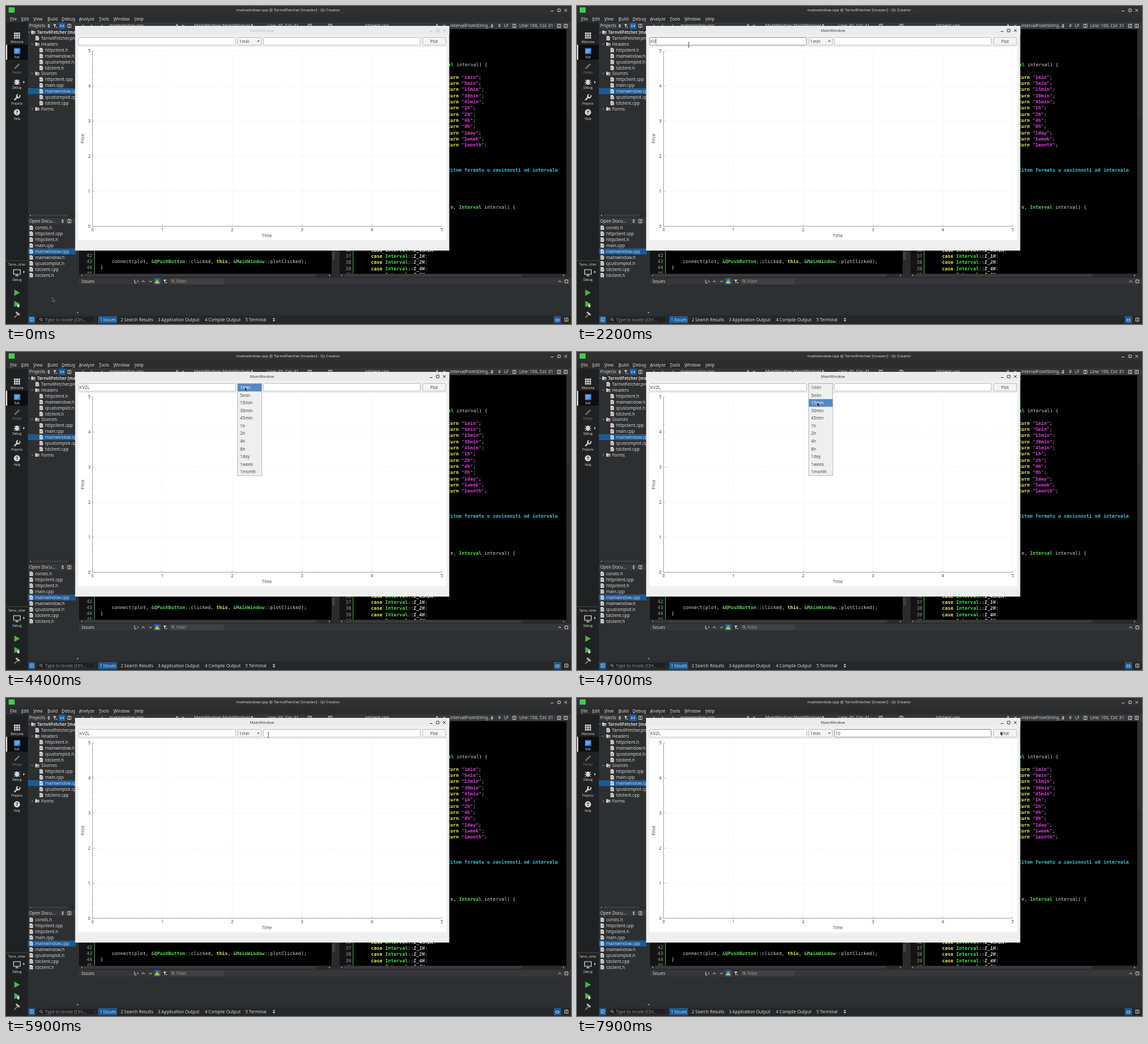
An HTML page for the animation above (8 s loop, 852 px wide and 480 px high).

```html
<!DOCTYPE html>
<html lang="en">
<head>
<meta charset="utf-8">
<title>IDE with plot window</title>
<style>
html, body { margin: 0; width: 100%; height: 100%; overflow: hidden; background: #000; }
svg { display: block; width: 100vw; height: 100vh; }
text { font-family: "Noto Sans", "Open Sans", sans-serif; white-space: pre; }
.mono { font-family: "DejaVu Sans Mono", "Noto Sans Mono", monospace; font-size: 7.08px; }
</style>
</head>
<body>
<svg id="stage" viewBox="0 0 852 480" xmlns="http://www.w3.org/2000/svg"></svg>
<script>
const LIGHT = '#d4d5d6', BLUE = '#1c5a96', GREEN = '#4be04b', YELLOW = '#f0f060',
      MAGENTA = '#e040e0', CYAN = '#30c8e0', DARK = '#4a4a4a';
const TRACK = '#2a2b2c', THUMB = '#3a3b3c', PANEL = '#2e2f30';
const PROJECT = 'TarnvilFetcher', SYMBOL = 'KVZL';
const INTERVALS = ['1min', '5min', '15min', '30min', '45min', '1h', '2h', '4h', '8h', '1day', '1week', '1month'];

const esc = s => s.replace(/&/g, '&amp;').replace(/</g, '&lt;');
const rect = (x, y, w, h, fill, extra = '') =>
  `<rect x="${x}" y="${y}" width="${w}" height="${h}" fill="${fill}" ${extra}/>`;
const path = (d, stroke = LIGHT, width = 0.9, extra = '') =>
  `<path d="${d}" fill="none" stroke="${stroke}" stroke-width="${width}" ${extra}/>`;
const shape = (d, fill = LIGHT, extra = '') => `<path d="${d}" fill="${fill}" ${extra}/>`;
// y is the vertical middle of the capitals
const text = (x, y, s, { size = 6.45, fill = LIGHT, anchor = 'start', extra = '' } = {}) =>
  `<text x="${x}" y="${y + size * 0.35}" font-size="${size}" fill="${fill}" text-anchor="${anchor}" ${extra}>${esc(s)}</text>`;
// runs with a colour of their own are bold
const code = (x, y, runs, extra = '') =>
  `<text class="mono" x="${x}" y="${y + 2.5}" ${extra}>` +
  runs.map(([s, fill, style = 'normal']) =>
    `<tspan fill="${fill || LIGHT}" font-weight="${fill ? 'bold' : 'normal'}" font-style="${style}">${esc(s)}</tspan>`).join('') + '</text>';
const range = (n, f) => Array.from({ length: n }, (_, i) => f(i)).join('');

const updown = (x, y) => shape(`M${x - 2} ${y - .6}l2 -2.4l2 2.4zM${x - 2} ${y + .6}l2 2.4l2 -2.4z`);
const funnel = (x, y) => shape(`M${x - 3} ${y - 2.5}h5l-2 2.5v3l-1 -1v-2z`) + rect(x + 1, y + 1.6, 2, 1, LIGHT);
const splitIcon = (x, y) => path(`M${x - 2.5} ${y - 2.5}h5v5h-5zM${x} ${y - 2.5}v5`, LIGHT, .8);
const cross = (x, y, r, stroke = LIGHT) => path(`M${x - r} ${y - r}l${2 * r} ${2 * r}m0 ${-2 * r}l${-2 * r} ${2 * r}`, stroke);
const square = (x, y, r, stroke = LIGHT) => path(`M${x - r} ${y - r}h${2 * r}v${2 * r}h${-2 * r}z`, stroke);
const fileIcon = (x, y) => shape(`M${x - 2.5} ${y - 3.3}h3.5l1.7 1.7v4.9h-5.2z`, '#d8d8d8') +
  path(`M${x - 1.4} ${y - .6}h2.8m-2.8 1.6h2.8`, '#777', .6);
const folderIcon = (x, y) => shape(`M${x - 3} ${y - 2.5}h2.5l1 1h2.8v4.2h-6.3z`, '#c9c9c9') + rect(x, y, 3, 2.6, '#a87878');
const magnifier = (x, y) => `<circle cx="${x}" cy="${y - .6}" r="1.7" fill="none" stroke="#aaa" stroke-width=".8"/>` +
  path(`M${x + 1.2} ${y + .6}l1.8 1.8`, '#aaa');

function chrome() {
  return rect(0, 0, 852, 480, '#000') + rect(0, 0, 852, 13, '#303030') + rect(0, 13, 852, 12, '#2b2c2d') +
    rect(4, 2, 9, 8, '#41cd52') +
    text(425.5, 6.3, `mainwindow.cpp @ ${PROJECT} [master] - Qt Creator`, { size: 6.03, anchor: 'middle' }) +
    path('M821.5 7.5h4') + square(834, 6.5, 1.9) + cross(844, 6.5, 2) +
    [[6, 'File'], [23, 'Edit'], [41, 'View'], [62.5, 'Build'], [84, 'Debug'], [110, 'Analyze'], [140, 'Tools'], [162, 'Window'], [193.5, 'Help']]
      .map(([x, s]) => text(x, 19.3, s) + path(`M${x} 22.8h3`, LIGHT, .5)).join('') +
    rect(33, 25, 819, 10, '#363738');
}

function editorBar() {
  return text(35, 29.8, 'Projects') + updown(64.5, 30) + funnel(74, 30) + rect(79.5, 25, 10, 10, BLUE) +
    path('M82 30h5M83.5 28.3h-1.5v3.4h1.5M85.5 28.3h1.5v3.4h-1.5', '#9ccfff', .8) + splitIcon(95.5, 30) +
    path('M117 28l-2 2l2 2M128 28l2 2l-2 2M145 28v4') + text(156, 29.5, 'mainwindow.cpp') +
    updown(258, 30) + cross(267, 30, 1.8) + text(284, 29.5, 'MainWindow::MainWindow(…') + updown(371, 30) +
    text(394, 29.5, 'Line: 40, Col: 41') + splitIcon(458, 30) + splitIcon(489, 30) +
    text(542, 29.5, 'tdclient.cpp') + updown(650, 30) + cross(661, 30, 1.8) +
    text(670, 29.8, 'intervalFromString…') + updown(733, 30) + text(742, 29.8, '#') + text(751, 29.8, 'LF') +
    splitIcon(766.5, 30) + text(774, 29.8, 'Line: 106, Col: 31') + splitIcon(834, 30) + splitIcon(844, 30);
}

function modeBar() {
  const label = (y, s, fill = LIGHT) => text(16.5, y, s, { size: 4.5, fill, anchor: 'middle' });
  const play = y => shape(`M12.5 ${y}l8.5 4.7l-8.5 4.7z`, '#46b84a');
  const submenu = y => shape(`M26 ${y}l2.3 2l-2.3 2z`);
  return rect(0, 25, 33, 455, '#202122') + rect(0, 58.5, 33, 22.5, '#0c0d0e') + rect(0, 58.5, 1.8, 22.5, '#e0e0e0') +
    range(9, i => rect(12 + i % 3 * 3.3, 40 + Math.floor(i / 3) * 3.3, 2.6, 2.6, LIGHT)) + label(54.3, 'Welcome') +
    rect(12, 63.5, 9.5, 9, '#3c7fd0') + path('M13.5 66h6.5m-6.5 2h6.5m-6.5 2h4', '#d8e8ff', .7) + label(77, 'Edit') +
    path('M13 94.5l7 -7', '#777', 2.2) + label(100.3, 'Design', '#777') +
    `<ellipse cx="16.5" cy="115" rx="3" ry="4" fill="${LIGHT}"/>` +
    path('M12 111.5l2.5 2m-3 2h10m-9.5 3.5l2.5 -2m6.5 -5.5l-2.5 2m2.5 5.5l-2.5 -2') +
    submenu(113) + label(123.6, 'Debug') +
    path('M12.5 142l5.5 -5.5', LIGHT, 2) + path('M20.5 134.5a2.6 2.6 0 1 1 -2.5 -1', LIGHT, 1.6) + label(147, 'Projects') +
    `<circle cx="16.5" cy="160.5" r="4.7" fill="${LIGHT}"/>` +
    text(16.5, 160.6, '?', { size: 7.5, fill: '#202122', anchor: 'middle', extra: 'font-weight="bold"' }) + label(170, 'Help') +
    path('M0 384.5h33', '#444') + label(390, 'Tarnv…tcher') +
    path('M11.5 398h10v7h-10zM14 407.3h5M16.5 405v2', LIGHT, 1.1) + submenu(399.5) + label(413.7, 'Debug') +
    play(428) + play(445) + `<ellipse cx="18.5" cy="452.5" rx="2" ry="2.6" fill="${LIGHT}"/>` +
    path('M12.5 470.5l6 -6', '#b07a5a', 1.6) + path('M15 462l5.5 4.5', '#bbb', 2.4);
}

function sidebar() {
  const headers = ['httpclient.h', 'mainwindow.h', 'qcustomplot.h', 'tdclient.h'];
  const sources = ['httpclient.cpp', 'main.cpp', 'mainwindow.cpp', 'qcustomplot.cpp', 'tdclient.cpp'];
  const docs = ['consts.h', 'httpclient.cpp', 'httpclient.h', 'main.cpp', 'mainwindow.cpp', 'mainwindow.h', 'qcustomplot.h', 'tdclient.cpp', 'tdclient.h'];
  const open = (x, y) => path(`M${x - 1.5} ${y - .8}l1.5 1.6l1.5 -1.6`, '#aaa', .8);
  const files = (list, x, top) => list.map((s, i) => fileIcon(x, top + i * 8.95) + text(x + 6, top + i * 8.95, s)).join('');
  const group = (y, s) => folderIcon(47, y) + text(53, y, s);
  return rect(33, 35, 77, 432, PANEL) + rect(33, 124, 72, 9, BLUE) + rect(33, 366, 72, 9, BLUE) +
    open(35, 39.5) + folderIcon(41, 39.5) + text(47, 39.5, `${PROJECT} [master]`, { size: 6.2, extra: 'font-weight="bold"' }) +
    fileIcon(47, 48.5) + text(53, 48.5, `${PROJECT}.pro`) +
    open(39.5, 57.5) + group(57.5, 'Headers') + files(headers, 53, 66.5) +
    open(39.5, 101.7) + group(101.7, 'Sources') + files(sources, 53, 110.7) +
    path('M38.7 154l1.6 1.5l-1.6 1.5', '#aaa', .8) + group(155.3, 'Forms') +
    rect(33, 313, 77, 6, TRACK) + rect(40, 314.2, 54, 3.6, THUMB) + shape('M37.5 314.5v3l-2 -1.5z', '#aaa') +
    rect(33, 320, 77, 9.5, '#363738') + text(35, 324.8, 'Open Docu…') + updown(85.5, 324.8) + splitIcon(95.5, 324.8) +
    files(docs, 38, 334.7) + path('M110.5 369v98', '#1a1a1a') + shape('M106.5 462h3l-1.5 2z', '#aaa');
}

function editors() {
  const number = (x, y, n) => code(x, y, [[String(n)]], 'opacity=".65"');
  const cases = ['I_45MIN', 'I_1H', 'I_2H', 'I_4H', 'I_8H'];
  return '<g clip-path="url(#code)">' + rect(110, 369, 23, 36, '#141414') + rect(503, 369, 21, 36, '#141414') +
    [42, 43, 44, 45].map((n, i) => number(121.5, 376 + i * 9.3, n)).join('') +
    path('M133.5 369v35M523.5 369v35', '#2f9a35', 1) +
    code(159.5, 385.3, [['connect(plot, &'], ['QPushButton', GREEN], ['::clicked, '], ['this', YELLOW], [', &'], ['MainWindow', GREEN], ['::plotClicked);']]) +
    code(142.5, 394.6, [['}']]) +
    cases.map((s, i) => number(512, 368 + i * 9.4, 36 + i) +
      code(550.5, 368 + i * 9.4, [['case ', YELLOW], ['Interval', GREEN], ['::'], [s, LIGHT, 'italic'], [':']])).join('') + '</g>' +
    code(640.8, 88.3, [['Interval', GREEN], [' interval) {']]) +
    INTERVALS.map((s, i) => code(657.2, 107 + i * 9.36, [['return ', YELLOW], [`"${s}"`, MAGENTA], [';']])).join('') +
    code(832, 247, [['različitom formatu u zavisnosti od intervala', CYAN]], 'text-anchor="end"') +
    code(670.2, 303, [['e, '], ['Interval', GREEN], [' interval) {']]) +
    rect(845, 35, 7, 369, TRACK) + rect(846, 35, 5, 134, '#303132') +
    rect(491, 369, 6, 35, TRACK) + rect(492, 371, 4, 12, '#404142') + rect(497, 369, 6, 41, TRACK) +
    rect(110, 404, 387, 6, TRACK) + rect(117, 405, 350, 3.6, THUMB) +
    rect(503, 404, 349, 6, TRACK) + rect(510, 405, 267, 3.6, THUMB) +
    shape('M115 405.2v3l-2 -1.5zM487 405.2v3l2 -1.5zM507 405.2v3l-2 -1.5zM840 405.2v3l2 -1.5z', '#aaa');
}

function bottomPanels() {
  const tabs = [[173, '2 Search Results'], [229, '3 Application Output'], [300, '4 Compile Output'], [361, '5 Terminal']];
  return rect(110, 410, 742, 57, PANEL) + rect(110, 410.5, 742, 10, '#363738') + text(114, 415.6, 'Issues') +
    path('M194 413v5h3M198 414l1.5 3M205 417l2 -2.5l2 2.5M216 414.5l2 2.5l2 -2.5') + rect(223, 410.5, 10, 10, BLUE) +
    shape('M228 412l3.7 6.5h-7.4z', '#f0c830') + path('M228 414.3v2.2', '#333', .8) + funnel(240, 415.5) +
    rect(247, 411, 81, 9, '#404142') + magnifier(251.5, 415.5) + text(257, 415.6, 'Filter', { fill: '#9a9b9c' }) +
    path('M833 417l2 -2.5l2 2.5') + square(845, 415.7, 2.2) +
    rect(33, 467, 819, 13, '#262728') +
    rect(33.5, 468, 10.5, 11, BLUE) + splitIcon(38.8, 473.3) +
    rect(47, 468.5, 87, 9.5, '#1f2021', 'stroke="#3a3b3c" stroke-width=".6"') + magnifier(52.5, 473.4) +
    text(59, 473.4, 'Type to locate (Ctrl…', { fill: '#8d8e8f' }) + rect(139, 468, 28.5, 11, BLUE) + text(141.5, 473.4, '1 Issues') +
    tabs.map(([x, s]) => text(x, 473.4, s)).join('') + updown(404, 473.4) +
    rect(826, 468, 11, 11, BLUE) + path('M829 475.5v-3h5v3z') + splitIcon(845, 473.4);
}

const field = (id, x, w, fill = '#fff') =>
  rect(x + .4, 47.5, w - .8, 11.5, fill, `id="${id}" rx="1.3" stroke="#b9b9b9" stroke-width=".8"`);

function plotWindow() {
  const app = (x, y, s, anchor = 'start', extra = '') => text(x, y, s, { size: 6.4, fill: DARK, anchor, extra });
  const px = v => 130.5 + v * 105.3, py = v => 332.5 - v * 52.9;
  const dots = 'stroke-dasharray="1 1.5"';
  return rect(104.3, 30, 564.1, 339.2, '#efefef') + rect(104.3, 30, 564.1, 13, '#ebebeb') + rect(109, 62, 555, 291.5, '#fff') +
    '<g id="caption">' + text(386, 36.7, 'MainWindow', { size: 5.95, fill: '#3c3c3c', anchor: 'middle' }) +
    path('M639 38.5h4', '#3c3c3c') + square(651, 37, 2, '#3c3c3c') + cross(661, 37, 2, '#3c3c3c') + '</g>' +
    field('symbolBox', 109, 237.5) + field('combo', 349, 36.5, '#f4f4f4') + field('countBox', 388, 237) + field('button', 628, 35.5, '#f4f4f4') +
    app(351.8, 53.4, '1min') + shape('M378.5 52.3h4l-2 2.4z', '#666') + app(645.5, 53.4, 'Plot', 'middle') +
    range(5, i => path(`M${px(i + 1)} 68V332M131 ${py(i + 1)}H657`, '#dedede', .6, dots)) +
    path('M130.5 68V332.5H657', '#8a8a8a', .7) +
    range(26, i => {
      const len = i % 5 ? 1.2 : 2.6;
      return path(`M${px(i / 5)} 332.5v${-len}M130.5 ${py(i / 5)}h${len}`, '#8a8a8a', .5);
    }) +
    range(6, i => app(px(i), 338, String(i), 'middle') + app(127.5, py(i), String(i), 'end')) +
    app(393.5, 347.2, 'Time', 'middle') + app(115.3, 200, 'Price', 'middle', 'transform="rotate(-90 115.3 200)"') +
    text(110.7, 53.4, '', { size: 6.7, fill: DARK, extra: 'id="symbol"' }) + text(389.5, 53.4, '', { size: 6.4, fill: DARK, extra: 'id="count"' }) +
    rect(0, 49, .7, 8.5, '#444', 'id="caret"') +
    '<g id="popup">' + rect(349.2, 47.5, 36.6, 139.3, '#efefef', 'stroke="#a8a8a8" stroke-width=".7"') +
    rect(349.5, 48, 36, 11.5, '#5488c2', 'id="hover"') + INTERVALS.map((s, i) => app(353, 53.7 + i * 11.57, s)).join('') + '</g>';
}

const pointer = '<g id="pointer"><g id="arrow">' +
  shape('M0 0V6L1.4 4.8L2.4 7.1L3.4 6.7L2.4 4.4H4.2Z', '#161616', 'stroke="#fff" stroke-width=".3"') + '</g>' +
  '<g id="beam">' + path('M-1.2 -3.6h2.4M0 -3.6V3.6M-1.2 3.6h2.4', '#444', .7) + '</g></g>';

document.getElementById('stage').innerHTML =
  '<defs><clipPath id="code"><rect x="110" y="369" width="735" height="35"/></clipPath></defs>' +
  chrome() + editorBar() + sidebar() + editors() + bottomPanels() + modeBar() + plotWindow() + pointer;

const el = Object.fromEntries([...document.querySelectorAll('[id]')].map(e => [e.id, e]));
const popupLabels = [...el.popup.querySelectorAll('text')];
const show = (e, on) => e.setAttribute('visibility', on ? 'visible' : 'hidden');
const within = (t, ...spans) => spans.some(([a, b]) => t >= a && t < b);

// time, x, y of the pointer
const route = [[0, 70, 440], [200, 70, 440], [900, 125, 235], [1400, 168.5, 58.5], [3600, 168.5, 58.5], [3700, 432, 92.5],
  [4300, 360, 53], [4500, 360, 53], [4800, 363, 84], [5100, 361, 55], [5300, 364, 58], [5400, 364, 58],
  [6000, 398, 56], [6300, 398, 56], [6400, 397, 63.7], [7300, 397, 63.7], [7600, 520, 24], [7900, 638.5, 50.5], [8000, 638.5, 50.5]];

function pointerAt(t) {
  const i = route.findIndex(k => k[0] > t);
  const [t0, x0, y0] = route[i - 1], [t1, x1, y1] = route[i];
  const u = (t - t0) / (t1 - t0), e = u * u * (3 - 2 * u);
  return [x0 + (x1 - x0) * e, y0 + (y1 - y0) * e];
}

function render(now) {
  const t = Math.floor(now % 8000 / 100) * 100;
  const [x, y] = pointerAt(t);
  el.pointer.setAttribute('transform', `translate(${x} ${y})`);
  const beam = within(t, [1300, 3700], [5900, 6400]);
  show(el.beam, beam);
  show(el.arrow, !beam);
  el.caption.setAttribute('opacity', Math.min(1, 0.25 + t / 400));

  const inSymbol = within(t, [1400, 4300]), inCount = t >= 6200;
  el.symbolBox.setAttribute('stroke', inSymbol ? '#858585' : '#b9b9b9');
  el.countBox.setAttribute('stroke', inCount ? '#858585' : '#b9b9b9');
  el.symbol.textContent = SYMBOL.slice(0, t < 2000 ? 0 : t < 2200 ? 1 : t < 3100 ? 2 : 4);
  el.count.textContent = t < 7000 ? '' : t < 7100 ? '1' : '10';
  const active = inCount ? el.count : el.symbol;
  el.caret.setAttribute('x', (inCount ? 388.8 : 110.5) + active.getComputedTextLength());
  show(el.caret, within(t, [1400, 1800], [2000, 2900], [3100, 4200], [6200, 6900], [7000, 7600]));

  const row = Math.max(0, Math.floor((y - 48) / 11.57));
  show(el.popup, within(t, [4300, 5200]));
  el.hover.setAttribute('y', 48 + row * 11.57);
  popupLabels.forEach((label, i) => label.setAttribute('fill', i === row ? '#fff' : DARK));
}

function tick() {
  render(performance.now());
  requestAnimationFrame(tick);
}
tick();
</script>
</body>
</html>
```
